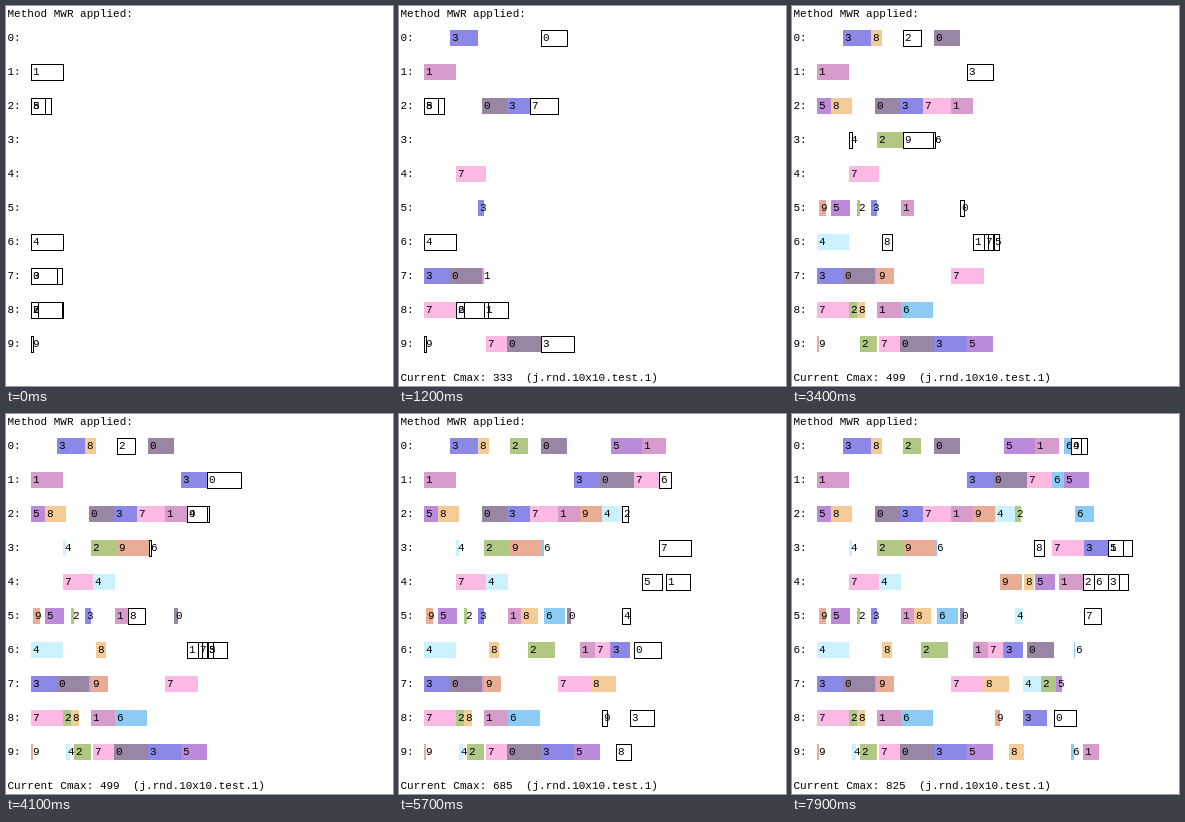
An HTML page with a canvas for the animation above (8000 ms loop, 387 by 380 pixels).

```html
<!DOCTYPE html>
<html lang="en">
<head>
<meta charset="utf-8">
<title>Job shop scheduling by most work remaining</title>
<style>
  html, body { margin: 0; width: 100%; height: 100%; overflow: hidden; background: #fff; }
  canvas { display: block; }
</style>
</head>
<body>
<canvas id="stage" width="387" height="380"></canvas>
<script>
const STEP_MS = 100, STEPS = 80;
const LEFT = 25, TOP = 24, ROW = 34, BAR = 16, SCALE = 0.3538;

// Each job: colour, machines in visiting order, processing times (the last one is the work left after them).
const jobs = [
  ['#9886a4', '72905168',   [90, 72, 97, 72, 11, 96, 76, 62, 47]],
  ['#d89ccc', '1785260493', [91, 7, 68, 37, 62, 43, 68, 68, 45, 67]],
  ['#b0c884', '859306274',  [22, 9, 48, 74, 50, 77, 17, 43, 31, 68]],
  ['#8c88e8', '7052916834', [74, 80, 17, 65, 92, 74, 55, 67, 70, 55]],
  ['#ccf2ff', '63942570',   [91, 9, 11, 62, 57, 22, 51, 30, 81]],
  ['#bb8ad8', '259604713',  [40, 54, 74, 2, 88, 57, 17, 71, 42, 6]],
  ['#8cccf4', '835109624',  [90, 5, 60, 34, 20, 8, 3, 54, 71, 4]],
  ['#fcb9e4', '849276135',  [92, 85, 58, 79, 93, 42, 70, 90, 49, 34]],
  ['#f4cc98', '280657943',  [59, 23, 31, 28, 48, 71, 43, 28, 28, 57]],
  ['#e8ad94', '95732840',   [7, 20, 48, 90, 62, 15, 62, 46, 58]]
].map(([color, route, times]) => ({ color, route, times }));

const ctx = document.getElementById('stage').getContext('2d');
const px = t => LEFT + Math.floor(t * SCALE);
const rowY = machine => TOP + ROW * machine;

// Earliest gap on the machine that holds the job's next operation.
function nextOp(state, machines) {
  const { job, done, ready } = state;
  const machine = +job.route[done], time = job.times[done];
  let start = ready;
  for (const op of machines[machine]) {
    if (start + time <= op.start) break;
    start = Math.max(start, op.end);
  }
  return { id: state.id, machine, start, end: start + time };
}

// Places the first `count` operations, always taking the job with most work remaining.
function schedule(count) {
  const machines = Array.from({ length: 10 }, () => []);
  const states = jobs.map((job, id) => ({
    id, job, done: 0, ready: 0, left: job.times.reduce((a, b) => a + b)
  }));
  let cmax = 0;
  for (let i = 0; i < count; i++) {
    const pick = states.reduce((a, b) => b.left > a.left ? b : a);
    const op = nextOp(pick, machines);
    machines[op.machine].push(op);
    machines[op.machine].sort((a, b) => a.start - b.start);
    pick.left -= pick.job.times[pick.done++];
    pick.ready = op.end;
    cmax = Math.max(cmax, op.end);
  }
  return { placed: machines.flat(), waiting: states.map(s => nextOp(s, machines)), cmax };
}

function drawOp(op, filled) {
  const x = px(op.start), y = rowY(op.machine), w = px(op.end) - x;
  if (filled) {
    ctx.fillStyle = jobs[op.id].color;
    ctx.fillRect(x, y, w, BAR);
  } else {
    ctx.strokeRect(x + 0.5, y + 0.5, w, BAR);
  }
  ctx.fillStyle = '#000';
  ctx.fillText(op.id, x + 2, y + 11);
}

function draw(step) {
  const { placed, waiting, cmax } = schedule(step);
  ctx.fillStyle = '#fff';
  ctx.fillRect(0, 0, 387, 380);
  ctx.font = '11px "Liberation Mono", monospace';
  ctx.strokeStyle = '#000';
  ctx.lineWidth = 1;
  ctx.fillStyle = '#000';
  ctx.fillText('Method MWR applied:', 1.5, 11);
  for (let m = 0; m < 10; m++) ctx.fillText(m + ':', 1.5, rowY(m) + 11);
  if (step) ctx.fillText(`Current Cmax: ${cmax}  (j.rnd.10x10.test.1)`, 1.5, 375);
  placed.forEach(op => drawOp(op, true));
  waiting.forEach(op => drawOp(op, false));
}

let shown = -1;
const startTime = performance.now();
function tick() {
  const step = Math.floor((performance.now() - startTime) / STEP_MS) % STEPS;
  if (step !== shown) draw(shown = step);
  requestAnimationFrame(tick);
}
tick();
</script>
</body>
</html>
```
